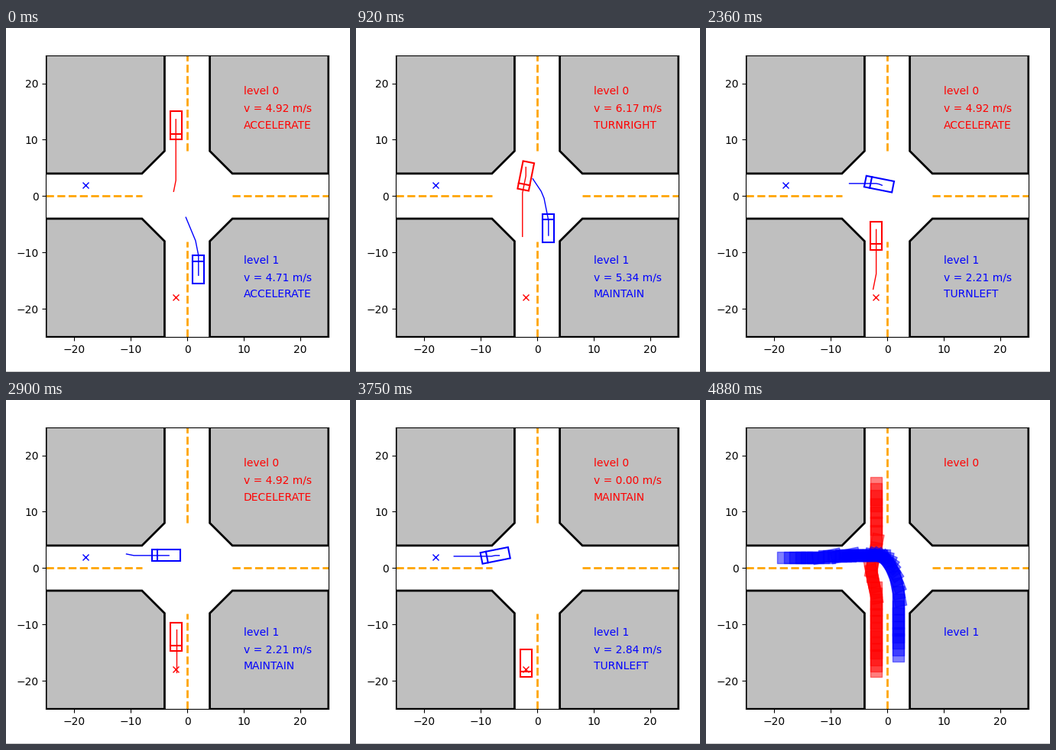
Animation, 450 px wide and 451 px high, one loop 7.88 s. Source, as a matplotlib script:

```python
import numpy as np
import matplotlib.pyplot as plt
from matplotlib.animation import FuncAnimation
from matplotlib.collections import PolyCollection
from matplotlib.patches import Polygon, Rectangle

W, H, DPI = 450, 451, 100
LOOP, TICK = 7880, 20
DT, ACC, TURN = 0.25, 2.5, np.pi / 4
HORIZON = 8

# letter: label, acceleration, turn rate
ACTIONS = {
    "M": ("MAINTAIN", 0, 0),
    "A": ("ACCELERATE", ACC, 0),
    "D": ("DECELERATE", -ACC, 0),
    "H": ("HARDBRAKE", -2 * ACC, 0),
    "L": ("TURNLEFT", 0, TURN),
    "R": ("TURNRIGHT", 0, -TURN),
}

# time each state stays on screen, in ms; the last one is the trail
HOLDS = ([130, 130, 200] * 2 + [130] * 5 + [200, 130, 130, 150, 180, 150]
         + [130] * 3 + [200] + [130] * 5 + [70] * 2
         + [130, 70, 130, 130, 70, 130, 130, 70, 130, 3000])
STARTS = np.cumsum([0] + HOLDS[:-1])
LAST = len(HOLDS) - 1


def step(state, key):
    x, y, heading, v = state
    _, acc, rate = ACTIONS[key]
    return (x + v * np.cos(heading) * DT, y + v * np.sin(heading) * DT,
            heading + rate * DT, max(0.0, v + acc * DT))


def roll(state, keys):
    states = [state]
    for key in keys:
        states.append(step(states[-1], key))
    return states


def box(state, x0=-2.5, x1=2.5):
    x, y, a, _ = state
    pts = np.array([(x0, -1), (x1, -1), (x1, 1), (x0, 1)])
    c, s = np.cos(a), np.sin(a)
    return pts @ np.array([[c, s], [-s, c]]) + (x, y)


class Car:
    def __init__(self, ax, level, color, start, keys, plans, eager, goal, text_y):
        self.keys, self.plans, self.eager = keys, plans, eager
        self.color = color
        # the car stops one step after its last action
        self.states = roll(start, keys + "M")
        self.body = ax.add_patch(Polygon(box(start), fill=False, ec=color, lw=1.5))
        self.nose, = ax.plot([], [], color=color, lw=1.5)
        self.path, = ax.plot([], [], color=color, lw=1)
        self.goal, = ax.plot(*goal, "x", color=color)
        ax.text(10, text_y, f"level {level}", color=color)
        self.speed = ax.text(10, text_y - 3, "", color=color)
        self.label = ax.text(10, text_y - 6, "", color=color)
        self.parts = [self.body, self.nose, self.path, self.goal,
                      self.speed, self.label]

    def plan(self, i):
        if i in self.plans:
            return self.plans[i]
        keys = self.keys[i:i + HORIZON]
        if i in self.eager:
            keys = keys[:4] + "AAAA"
        return keys.ljust(HORIZON, "H")

    def show(self, i):
        moving = i < len(self.keys)
        state = self.states[min(i + 1, len(self.states) - 1)]
        self.body.set_xy(box(state))
        self.nose.set_data(*box(state, x1=1.5)[1:3].T)
        pts = roll(self.states[i], self.plan(i)) if moving else []
        self.path.set_data([p[0] for p in pts], [p[1] for p in pts])
        self.speed.set_text(f"v = {state[3] if moving else 0:.2f} m/s")
        self.label.set_text(ACTIONS[self.keys[i] if moving else "M"][0])

    def set_visible(self, on):
        for part in self.parts:
            part.set_visible(on)


def draw_roads(ax):
    corner = np.array([(25, 25), (4, 25), (4, 8), (8, 4), (25, 4)])
    for sx in (-1, 1):
        for sy in (-1, 1):
            ax.add_patch(Polygon(corner * (sx, sy), fc="#bfbfbf", ec="black", lw=2))
    for ends in ((-25, -8), (8, 25)):
        ax.plot(ends, (0, 0), "--", color="orange", lw=2)
        ax.plot((0, 0), ends, "--", color="orange", lw=2)


def make_trail(ax, cars):
    boxes, colors = [], []
    for i in range(LAST + 1):
        for car in cars:
            if i < len(car.states):
                boxes.append(box(car.states[i]))
                colors.append(car.color)
    trail = PolyCollection(boxes, facecolors=colors, edgecolors=colors,
                           lw=1, alpha=0.5, zorder=3)
    ax.add_collection(trail, autolim=False)
    return trail


plt.rcParams.update({"font.family": "DejaVu Sans", "font.size": 10})
fig = plt.figure(figsize=(W / DPI, H / DPI), dpi=DPI, facecolor="white")
ax = fig.add_axes([52.2 / W, 45.8 / H, 369.6 / W, 369.6 / H])
ax.set(xlim=(-25, 25), ylim=(-25, 25))
ax.set_xticks(range(-20, 21, 10))
ax.set_yticks(range(-20, 21, 10))
fig.add_artist(Rectangle((0, 0), 1, 1 / H, color="#c8c8c8", lw=0))

draw_roads(ax)
red = Car(ax, 0, "red", (-2, 13.6, -np.pi / 2, 4.297),
          "AAAADMRHHLLADARMAADADMDM",
          {0: "AAAAAARM", 6: "RMLMMMMM", 11: "AARAAMRM",
           16: "AAMMMRMM", 20: "DDDDMMMM"},
          (), (-2, -18), 18)
blue = Car(ax, 1, "blue", (2, -14.05, np.pi / 2, 4.088),
           "AMMMAMMLDLHLHLLLLLADMMMMAMLRAALRMMMA",
           {0: "AALMLAAM", 6: "MLMMLLMM", 11: "LLLLLLMM",
            16: "LLAAMMMM", 20: "MAAAAARM", 26: "LRAAAAAA"},
           range(13, 31), (-18, 2), -12)
cars = (red, blue)
trail = make_trail(ax, cars)


def update(frame):
    t = frame * TICK + TICK / 2
    i = int(np.searchsorted(STARTS, t, side="right")) - 1
    done = i == LAST
    trail.set_visible(done)
    for car in cars:
        car.set_visible(not done)
        if not done:
            car.show(i)


anim = FuncAnimation(fig, update, frames=LOOP // TICK, interval=TICK,
                     init_func=lambda: update(0), repeat=True, repeat_delay=0)
plt.show()
```
